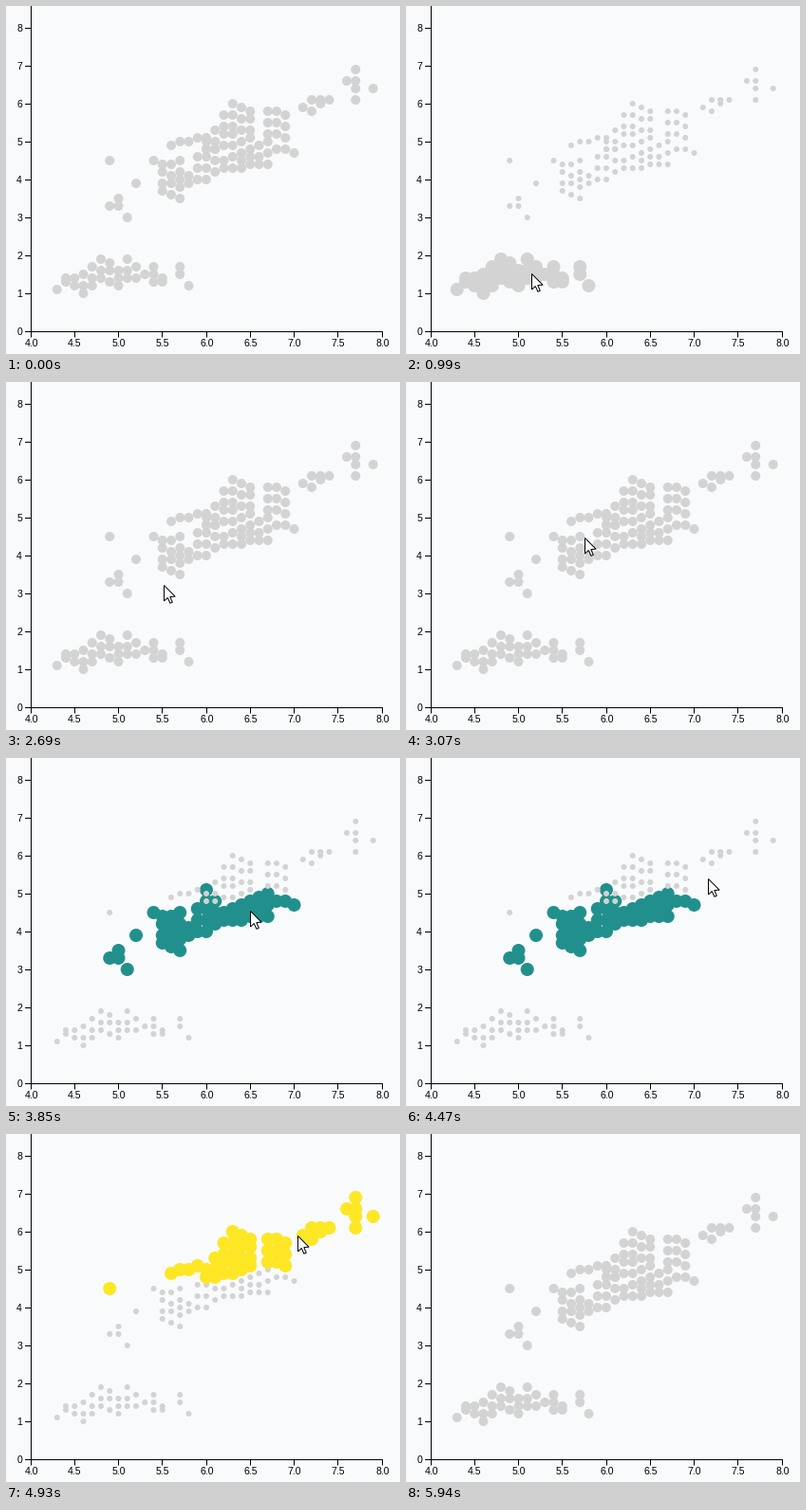
Recreate the animation shown at these times as a matplotlib script. Size 415x367 px, loop 6.72 s.

```python
import math
import matplotlib.pyplot as plt
import numpy as np
from matplotlib.animation import FuncAnimation
from matplotlib.colors import to_rgb
from matplotlib.patches import Polygon

W, H, DPI = 415, 367, 100
LOOP, TICK = 6720, 20
STEP = 77.2              # pace at which the picture is refreshed
PX = 72 / DPI            # one pixel in points
FADE = 200

BACK = "#f8fafc"
GREY = np.array(to_rgb("lightgrey"))
TINTS = [np.array(to_rgb(c)) for c in ("#6689ff", "#21908d", "#fde725")]

# Outline of each cluster as runs of (x, lowest y, highest y), in tenths
LOW = [[(43, 11, 11), (44, 13, 14), (46, 10, 15), (48, 14, 19), (50, 12, 16),
        (51, 14, 19), (53, 15, 15), (54, 13, 17), (55, 13, 14)],
       [(57, 15, 17), (58, 12, 12)]]
MID = [[(49, 33, 33), (50, 33, 35), (51, 30, 30), (52, 39, 39)],
       [(54, 45, 45), (55, 37, 44), (57, 35, 45), (58, 39, 41), (60, 40, 51),
        (62, 43, 45), (67, 44, 50), (68, 48, 48), (70, 47, 47)]]
HIGH = [[(49, 45, 45)],
        [(56, 49, 49), (59, 51, 51), (60, 48, 50), (63, 49, 60), (65, 51, 58)],
        [(67, 52, 58), (69, 51, 57)],
        [(71, 59, 59), (72, 58, 61), (74, 61, 61)],
        [(76, 66, 66), (77, 61, 69)], [(79, 64, 64)]]

# Hovers: group, pointer enters, colour appears, pointer leaves
HOVERS = [(0, 800, 1200, 2220), (1, 2755, 2755, 2765),
          (1, 3640, 3840, 4485), (2, 4690, 4890, 5630)]

# Pointer stops: arrives, leaves, x, y
STOPS = [(530, 530, 150, 360), (993, 993, 132, 282), (1071, 2152, 135, 284),
         (3078, 3470, 188, 164), (4005, 4170, 285, 160),
         (4477, 4477, 319, 126), (4853, 5560, 307, 107),
         (5930, 5930, 298, 366)]
PATH = np.array([(t, x, y) for a, b, x, y in STOPS for t in (a, b)])
ARROW = np.array([(0, 0), (0, 16.5), (3.8, 13), (6.4, 18.8), (8.8, 17.8),
                  (6.3, 12), (11.6, 11.7)])


def sx(v):
    return 26 + (v - 4) * 92.5


def sy(v):
    return 343 - v * 40


def fill(run):
    """Spread points over every column of an outline."""
    xs, low, high = zip(*run)
    for x in range(xs[0], xs[-1] + 1):
        lo, hi = (round(np.interp(x, xs, edge)) for edge in (low, high))
        for y in np.linspace(lo, hi, 1 + math.ceil((hi - lo) / 3)):
            yield sx(x / 10), sy(round(y) / 10)


def ease(p):
    p = min(max(p, 0), 1)
    return 4 * p ** 3 if p < 0.5 else 1 - 4 * (1 - p) ** 3


def dot_state(t):
    """Radius and colour of each group at time t."""
    radii = np.full(3, 5.0)
    colors = np.tile(GREY, (3, 1))
    for hit, on, paint, off in HOVERS:
        if t < on:
            break
        goal = np.full(3, 3.0)
        goal[hit] = 7
        radii += (goal - radii) * ease((min(t, off) - on) / FADE)
        if t >= paint:
            colors[hit] = TINTS[hit]
        back = ease((t - off) / FADE)
        radii += (5 - radii) * back
        colors += (GREY - colors) * back
    return radii, colors


fig = plt.figure(figsize=(W / DPI, H / DPI), dpi=DPI, facecolor=BACK)
ax = fig.add_axes([0, 0, 1, 1])
ax.set(xlim=(0, W), ylim=(H, 0))
ax.axis("off")


def line(xs, ys):
    ax.plot(xs, ys, color="black", lw=PX, solid_capstyle="butt",
            snap=False, zorder=1)


def label(x, y, text, ha):
    ax.text(x, y, text, ha=ha, va="baseline", fontsize=10.5 * PX,
            family="Liberation Sans", color="black", zorder=1)


line([26.5, 26.5], [0, 349])
line([20, 397], [343.5, 343.5])
for v in range(9):
    y = sy(v) + 0.5
    line([20, 26.5], [y, y])
    label(17, y + 3.5, str(v), "right")
for v in np.arange(4, 8.1, 0.5):
    x = math.floor(sx(v)) + 0.5
    line([x, x], [343.5, 349.5])
    label(x, 359, f"{v:.1f}", "center")

pts = [(*p, g) for g, runs in enumerate((LOW, MID, HIGH))
       for run in runs for p in fill(run)]
px, py, group = np.array(pts).T
group = group.astype(int)
dots = ax.scatter(px, py, linewidths=0, zorder=2)
pointer = ax.add_patch(Polygon(ARROW, closed=True, fc="white", ec="black",
                               lw=PX, joinstyle="miter", snap=False, zorder=3))


def update(i):
    t = (i * TICK + 30) // STEP * STEP - 10
    radii, colors = dot_state(t)
    dots.set_sizes((2 * radii[group] * PX) ** 2)
    dots.set_facecolors(colors[group])
    pointer.set_visible(PATH[0, 0] <= t <= PATH[-1, 0])
    tip = [np.interp(t, PATH[:, 0], PATH[:, k]) for k in (1, 2)]
    pointer.set_xy(ARROW + np.round(tip) + 0.5)
    return dots, pointer


anim = FuncAnimation(fig, update, frames=LOOP // TICK, interval=TICK,
                     repeat=True, repeat_delay=0)
plt.show()
```
